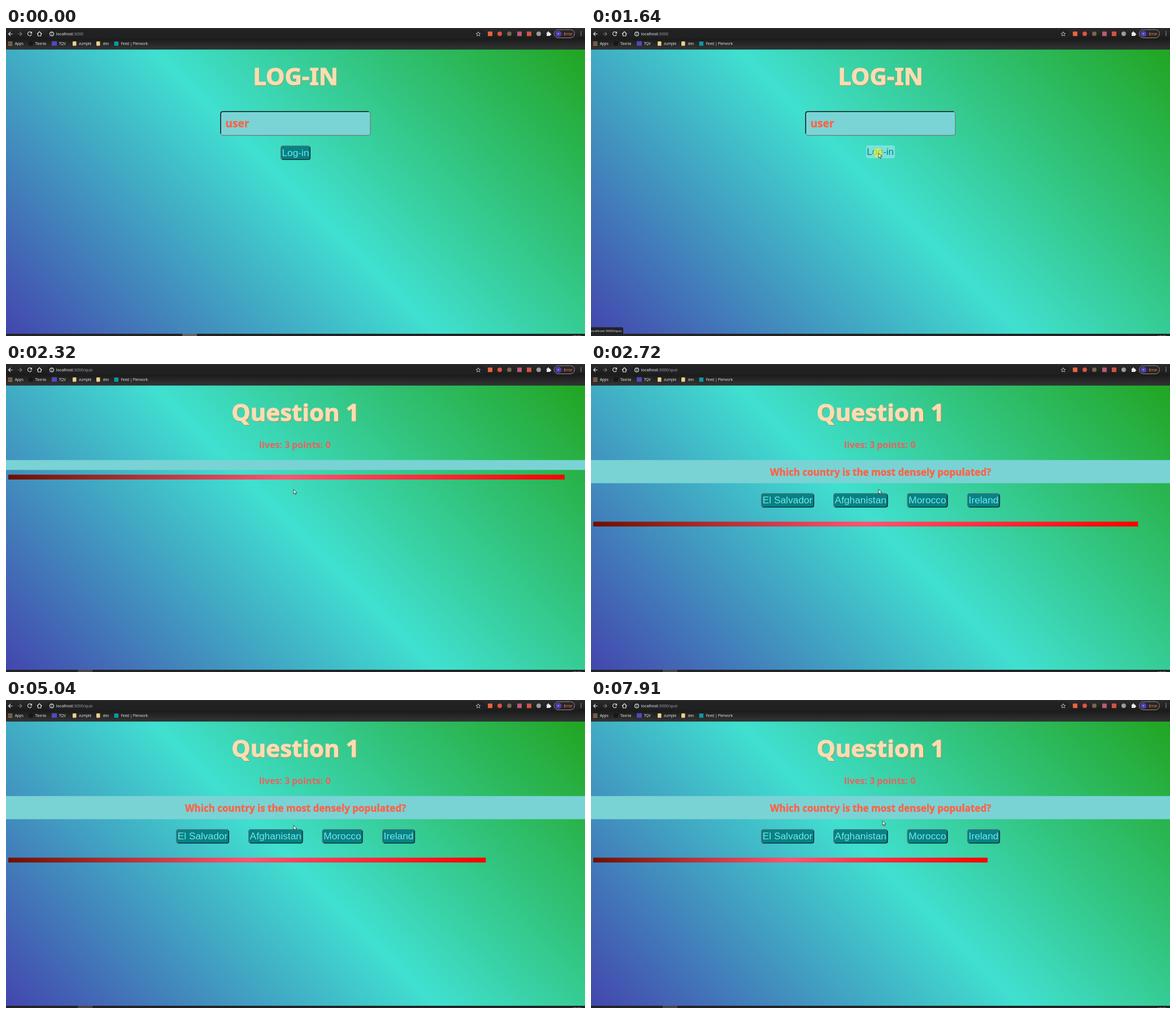
An HTML page that plays this animation: 1025 by 546 pixels, repeating every 7990 ms.

```html
<!DOCTYPE html>
<html lang="en">
<head>
<meta charset="utf-8">
<title>Quiz</title>
<style>
  html, body { margin: 0; width: 100%; height: 100%; overflow: hidden; background: #222; }
  svg { display: block; width: 100vw; height: 100vh; }
  text { font-family: "Noto Sans", "Open Sans", sans-serif; white-space: pre; }
  .mid { text-anchor: middle; }
  .title { font-size: 42px; font-weight: 700; }
  .title .face { fill: #f7deb3; stroke: #f7deb3; stroke-width: 1.1; }
  .title .shade { fill: #b98a4e; stroke: #b98a4e; stroke-width: 1.1; }
  .strong { font-weight: 700; fill: #ff6347; stroke: #ff6347; stroke-width: .45; }
  .score { font-size: 16.1px; font-weight: 700; fill: #ee5f5c; }
  .button text { font: 17.3px "Liberation Sans", Arial, sans-serif; fill: #74e6e4; }
  .mark { font-size: 6.4px; fill: #e4e5e7; }
  .url { font-size: 7.1px; fill: #9aa0a6; }
  .line { fill: none; stroke: #e8eaed; stroke-width: 1.1; }
</style>
</head>
<body>
<svg viewBox="0 0 1025 546" preserveAspectRatio="none">
  <defs>
    <linearGradient id="sky" gradientUnits="userSpaceOnUse" x1="130.25" y1="672.25" x2="894.75" y2="-92.25">
      <stop offset="0" stop-color="#4346ae"/>
      <stop offset=".5" stop-color="#40e0d0"/>
      <stop offset="1" stop-color="#22a522"/>
    </linearGradient>
    <linearGradient id="heat">
      <stop offset="0" stop-color="#6e1000"/>
      <stop offset=".5" stop-color="#ff5470"/>
      <stop offset="1" stop-color="#ff0000"/>
    </linearGradient>
    <linearGradient id="chrome" x2="0" y2="1">
      <stop offset="0" stop-color="#2c2c2d"/>
      <stop offset=".5" stop-color="#1b1b1c"/>
      <stop offset="1" stop-color="#343435"/>
    </linearGradient>
  </defs>

  <rect y="38" width="1025" height="504" fill="url(#sky)"/>

  <g id="login">
    <g class="title" data-title="LOG-IN"></g>
    <rect x="380" y="148.3" width="265" height="42" rx="4" fill="#7ad4d5" stroke="#6c7777" stroke-width="1.2"/>
    <path d="M380 187V152q0-3.7 4-3.7H642" fill="none" stroke="#12191a" stroke-width="1.4"/>
    <text class="strong" x="388.5" y="176" font-size="19">user</text>
    <g id="idle"></g>
    <g id="hover">
      <rect x="487" y="208" width="51" height="23" rx="4" fill="#79e2dc"/>
      <g class="button"><text class="mid" x="512.2" y="225" style="fill:#0a7f86">Log-in</text></g>
    </g>
  </g>

  <g id="quiz">
    <g class="title" data-title="Question 1"></g>
    <text class="score" x="448" y="149">lives: 3</text>
    <text class="score" x="506" y="149">points: 0</text>
    <rect id="strip" y="170.3" width="1025" fill="#79d3d5"/>
    <g id="question">
      <text class="strong mid" x="512.7" y="198" font-size="17">Which country is the most densely populated?</text>
      <g id="answers"></g>
    </g>
    <rect id="bar" x="4" height="8.6" fill="url(#heat)"/>
  </g>

  <g id="status">
    <path d="M0 530.5H54.500q2.500 0 2.500 2.500V542H0Z" fill="#202124"/>
    <text x="-1.700" y="538.600" font-size="6.150" fill="#dfe1e5">localhost:3000/quiz</text>
  </g>

  <rect y="542" width="1025" height="4" fill="#232425"/>
  <rect id="task" y="542" width="26" height="4"/>
  <text x="1003" y="549.300" font-size="6" fill="#eee">17:21</text>

  <rect width="1025" height="38" fill="url(#chrome)"/>
  <rect x="71" y="2.500" width="776" height="15.500" rx="7.700" fill="#202123"/>
  <rect y="37.300" width="1025" height=".9" fill="#20302f"/>
  <path class="line" d="M11.500 10.500H4.500M8 7l-3.500 3.500L8 14"/>
  <path class="line" d="M21 10.500h7M24.500 7l3.500 3.500-3.500 3.500" style="stroke:#76787b"/>
  <path class="line" d="M45 8.300A3.500 3.500 0 1 0 45.300 11.500M45.500 6.500v2.700h-2.700"/>
  <path class="line" d="M55 10.500l4.200-4 4.200 4M56.500 9.500v4.500h5.400V9.500"/>
  <g class="line" stroke-width=".9"><circle cx="81" cy="10.500" r="3.400"/><path d="M81 10v2.300M81 8.300v.8"/></g>
  <text class="url" x="88.700" y="13"><tspan fill="#eceef0">localhost</tspan>:3000<tspan id="path">/quiz</tspan></text>
  <g id="apps"></g>
  <g id="marks"></g>
  <path d="M836 6.700l1.100 2.500 2.700.3-2 1.800.6 2.700-2.400-1.400-2.400 1.400.6-2.700-2-1.800 2.700-.3z" fill="none" stroke="#d5d7da" stroke-width=".8"/>
  <g id="extensions"></g>
  <path d="M957 8h2q-.6-2 1-2t1 2h2.500v2.200q1.700-.5 1.700 1t-1.700 1V14H957v-2q1.500-.8 0-1.800z" fill="#eceef0"/>
  <rect x="970.500" y="3" width="36" height="14.500" rx="7.200" fill="#2a2526" stroke="#b9a09b" stroke-width=".8"/>
  <circle cx="978" cy="10.200" r="5.300" fill="#5040b8"/>
  <circle cx="978" cy="10.200" r="1" fill="#c9c2f5"/>
  <text x="987.500" y="12.600" font-size="6.400" fill="#f28b72">Error</text>
  <path d="M1018 7v7.500" stroke="#eceef0" stroke-width="1.500" stroke-linecap="round" stroke-dasharray="0 3"/>

  <circle id="click" r="8.500" fill="#e6ee3c" opacity=".72"/>
  <path id="cursor" d="M0 0V8.200L1.900 6.500 3.200 9.500 4.700 8.900 3.400 6H6Z" fill="#fff" stroke="#222" stroke-width=".8"/>
</svg>

<script>
const LOOP = 7990, QUIZ_AT = 1720, QUESTION_AT = 2480;
const $ = id => document.getElementById(id);
const show = (id, on) => $(id).setAttribute("visibility", on ? "inherit" : "hidden");
const set = (id, attrs) => {
  for (const key in attrs) $(id).setAttribute(key, attrs[key]);
};

const button = (label, x, y, width) => `
  <g class="button">
    <rect x="${x + .6}" y="${y + .6}" width="${width - 1.2}" height="24" rx="3.6" fill="#068286" stroke="#55706f" stroke-width="1.2"/>
    <path d="M${x + 3} ${y + 24.6}h${width - 6.500}q2.900 0 2.900-3V${y + 3}" fill="none" stroke="#0b2526" stroke-width="1.3"/>
    <text class="mid" x="${x + width / 2}" y="${y + 18}">${label}</text>
  </g>`;

for (const group of document.querySelectorAll("[data-title]")) {
  const text = group.dataset.title;
  group.innerHTML = `<text class="mid shade" x="513.3" y="102">${text}</text>
    <text class="mid face" x="512.5" y="101.2">${text}</text>`;
}

$("idle").innerHTML = button("Log-in", 486, 208.500, 53);
$("answers").innerHTML = [
  ["El Salvador", 301, 94], ["Afghanistan", 429, 96.500], ["Morocco", 559.500, 72], ["Ireland", 666, 58]
].map(([label, x, width]) => button(label, x, 229, width)).join("");

const dotColors = ["#e8685c", "#e3a54c", "#62b56b"];
$("apps").innerHTML = Array.from({ length: 9 }, (_, i) =>
  `<rect x="${3.700 + i % 3 * 2.800}" y="${24 + Math.floor(i / 3) * 2.800}" width="1.900" height="1.900" fill="${dotColors[i % 3]}"/>`
).join("");

const bookmarks = [
  ["Apps", 15.700],
  ["Tavrox", 52, '<circle cx="44" cy="27.500" r="4" fill="#151617"/>'],
  ["TQV", 93.700, '<rect x="81" y="23.500" width="9" height="8" fill="#4b4cc0"/>'],
  ["zumple", 129, '<rect x="118" y="23.800" width="6.500" height="7.600" rx="1" fill="#f4d08c"/>'],
  ["dev", 171.500, '<rect x="160" y="23.800" width="6.500" height="7.600" rx="1" fill="#f4d08c"/>'],
  ["Feed | Plenvork", 203.500, '<rect x="191.500" y="24" width="7.500" height="7.500" fill="#0c98a6"/>']
];
$("marks").innerHTML = bookmarks.map(([label, x, icon = ""]) =>
  `${icon}<text class="mark" x="${x}" y="29.800">${label}</text>`).join("");

const extensions = [
  [857, "#e9643f", 1], [874, "#e0523d", 0], [891, "#75664f", 0],
  [909, "#b85a78", 1], [926, "#d7533f", 1], [943, "#999b9e", 0]
];
$("extensions").innerHTML = extensions.map(([x, color, square]) =>
  `<rect x="${x - 4}" y="6.300" width="8" height="8" rx="${square ? 0 : 4}" fill="${color}"/>`).join("");

// Pointer waypoints: time, x, y
const waypoints = [
  [150, 924, 505], [910, 499, 308], [1250, 508, 223], [1400, 509, 222],
  [5600, 509, 222], [5990, 511, 219], [6380, 515, 214.500], [7650, 515, 214.500], [7800, 516, 214]
];

function pointerAt(t) {
  const next = waypoints.findIndex(p => p[0] > t);
  if (next === 0) return waypoints[0].slice(1);
  if (next < 0) return waypoints[waypoints.length - 1].slice(1);
  const [t0, x0, y0] = waypoints[next - 1], [t1, x1, y1] = waypoints[next];
  const k = (t - t0) / (t1 - t0), ease = k * k * (3 - 2 * k);
  return [x0 + (x1 - x0) * ease, y0 + (y1 - y0) * ease];
}

function render(t) {
  const [x, y] = pointerAt(t);
  const onQuiz = t >= QUIZ_AT, asked = t >= QUESTION_AT;
  const hovering = !onQuiz && y < 232;

  show("login", !onQuiz);
  show("quiz", onQuiz);
  show("path", onQuiz);
  show("idle", !onQuiz && !hovering);
  show("hover", hovering);
  show("status", hovering || onQuiz && t < 1870);
  show("question", asked);
  show("task", t < 980 || onQuiz);
  set("task", onQuiz ? { x: 127, fill: "#484848" } : { x: 312, fill: "#636363" });

  const end = Math.min(1021, 989 - .0513 * (t - 2320));
  set("strip", { height: asked ? 41 : 17.500 });
  set("bar", { y: asked ? 279.500 : 196.200, width: end - 4 });

  show("cursor", t >= 150);
  set("cursor", { transform: `translate(${x} ${y})` });
  show("click", t >= 1560 && t < 1790);
  set("click", { cx: x - 1, cy: y - .5 });
}

function tick(now) {
  render(now % LOOP);
  requestAnimationFrame(tick);
}
render(0);
requestAnimationFrame(tick);
</script>
</body>
</html>
```
